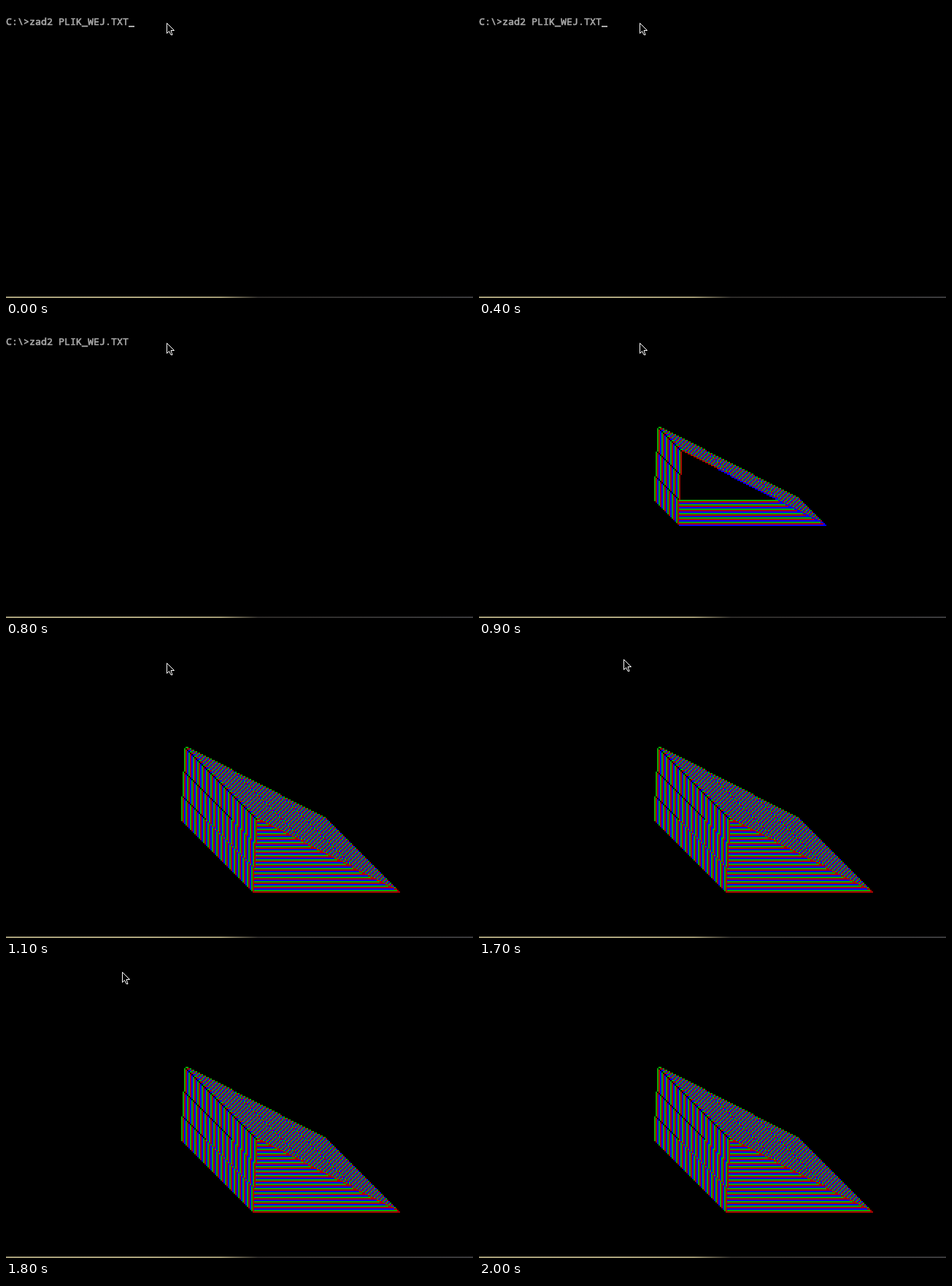
An HTML page with a canvas that plays this animation: 640 px wide and 400 px high, repeating every 2900 ms.

```html
<!DOCTYPE html>
<html lang="pl">
<head>
<meta charset="utf-8">
<title>zad2</title>
<style>
  html, body { margin: 0; width: 100%; height: 100%; overflow: hidden; background: #000; }
  canvas { display: block; }
</style>
</head>
<body>
<canvas id="stage" width="640" height="400"></canvas>
<script>
const ctx = document.getElementById('stage').getContext('2d');
const LOOP = 2900, STEP = 100;
const COLORS = ['#00aa00', '#aa0000', '#0000ff'];
const A = [123, 69], B = [120, 119], C = [220, 119];
const TRIANGLES = 50;

// Truncating line, stepped along its longer axis, without its last point
function line([x0, y0], [x1, y1]) {
  const dx = x1 - x0, dy = y1 - y0, n = Math.max(Math.abs(dx), Math.abs(dy));
  return Array.from({ length: n }, (_, i) =>
    [x0 + Math.floor(dx * i / n), y0 + Math.floor(dy * i / n)]);
}
const outline = [...line(B, C), ...line(C, A), ...line(A, B)];
const SIZE = outline.length;

// Plots pixels from..to of the run of triangles, each one moved by (1, 1)
function plot(from, to) {
  for (let n = from; n < to; n++) {
    const k = Math.floor(n / SIZE), [x, y] = outline[n % SIZE];
    ctx.fillStyle = COLORS[k % 3];
    ctx.fillRect((x + k) * 2, (y + k) * 2, 2, 2);
  }
}

function drawSolid(t) {
  if (t < 1000) plot(0, 17 * SIZE + 174);
  else if (t < 1100) {
    plot(0, 38 * SIZE + 123);
    plot(39 * SIZE, 39 * SIZE + 20);
  } else plot(0, TRIANGLES * SIZE);
}

function drawPrompt(t) {
  ctx.fillStyle = ctx.strokeStyle = '#aaa';
  ctx.font = '13.33px "Noto Sans Mono", monospace';
  ctx.lineWidth = 0.6;
  [...'C:\\>zad2 PLIK_WEJ.TXT'].forEach((ch, i) => {
    ctx.fillText(ch, i * 8, 26);
    ctx.strokeText(ch, i * 8, 26);
  });
  const cursorOn = t >= 600 ? t < 800 : t % 200 < 100;
  if (cursorOn) ctx.fillRect(168, 27, 8, 2);
}

function pointerAt(t) {
  if (t < 1700) return [220, 23];
  if (t < 1800) return [198, 18];
  if (t < 1900) return [159, 8];
  if (t < 2000) return [114, -6];
  return null;
}

function drawPointer([x, y]) {
  const arrow = new Path2D('M0 0V14L3 11L5.5 16H7.5L5.5 10H10Z');
  ctx.save();
  ctx.translate(x + 0.5, y + 0.5);
  ctx.fillStyle = '#000';
  ctx.strokeStyle = '#fff';
  ctx.lineWidth = 1;
  ctx.lineJoin = 'round';
  ctx.fill(arrow);
  ctx.stroke(arrow);
  ctx.restore();
}

const strip = ctx.createLinearGradient(0, 0, 640, 0);
[[0, '#a59d78'], [0.3, '#aaa27c'], [0.46, '#9c9470'], [0.54, '#2a2826'], [1, '#3a3a3c']]
  .forEach(([at, color]) => strip.addColorStop(at, color));

function draw(t) {
  ctx.fillStyle = '#000';
  ctx.fillRect(0, 0, 640, 400);
  ctx.fillStyle = strip;
  ctx.fillRect(0, 398, 640, 2);
  if (t < 900) drawPrompt(t);
  else drawSolid(t);
  const pointer = pointerAt(t);
  if (pointer) drawPointer(pointer);
}

let shown = -1;
function tick() {
  const step = Math.floor(performance.now() % LOOP / STEP);
  if (step !== shown) draw((shown = step) * STEP);
  requestAnimationFrame(tick);
}
tick();
</script>
</body>
</html>
```
